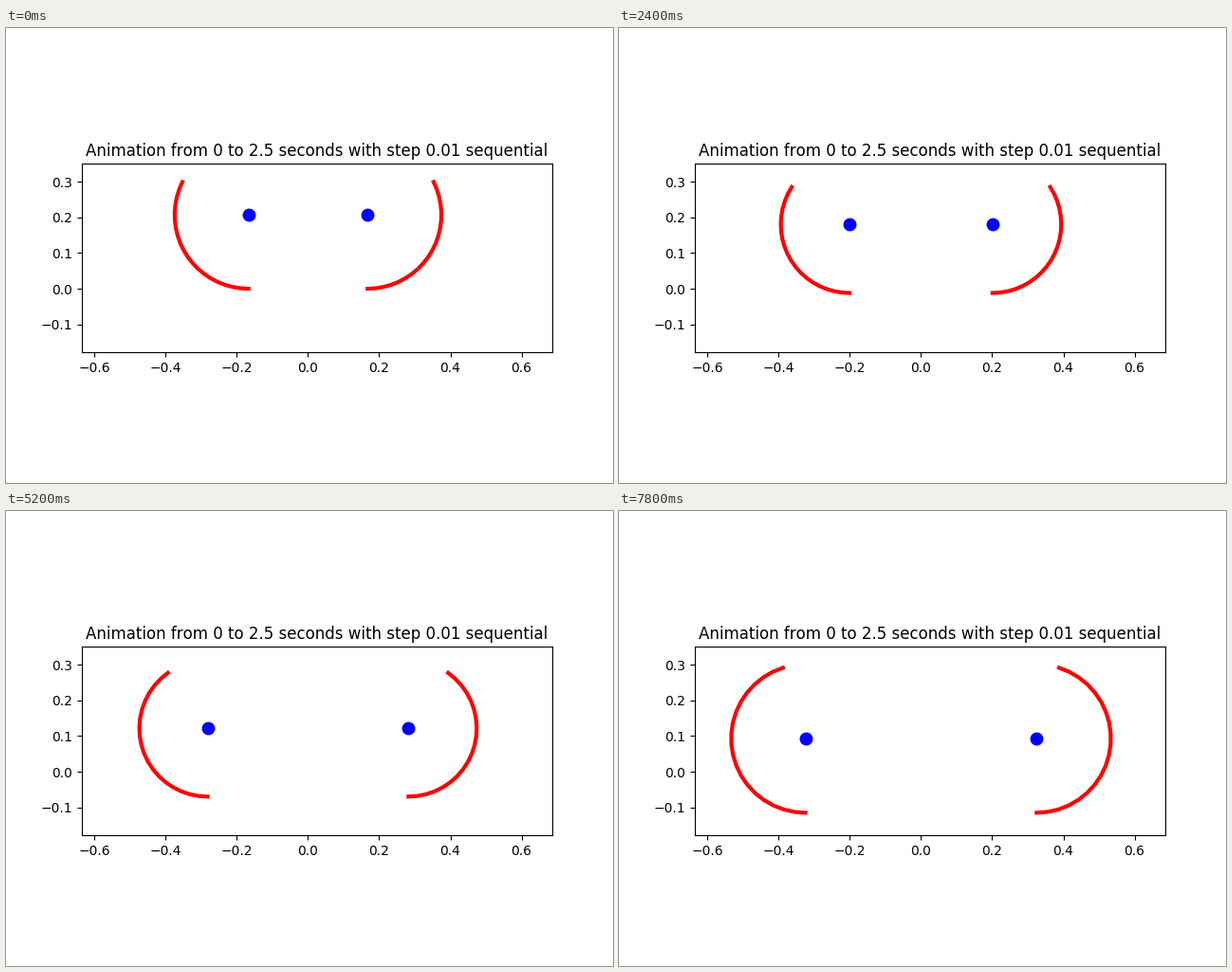
Recreate the animation shown at these times as a matplotlib script. Size 640 px wide and 480 px high, loop 8000 ms.

```python
import numpy as np
import matplotlib.pyplot as plt
from matplotlib.animation import FuncAnimation

FRAMES, INTERVAL = 40, 200
DT = 0.01
MASS, PRESSURE, G = 100, 2000, 10
AX, AY = 0.353, 0.3            # initial attachment point of the membrane
LENGTH = 3 * np.pi / 8         # total membrane length


def side_radius(phi):
    return (LENGTH / 2 - AX) / (phi - np.sin(phi))


def wrap_angle(height):
    """Angle of the side arc for a given attachment height (bisection)."""
    lo, hi = 1.0, np.pi
    for _ in range(60):
        phi = (lo + hi) / 2
        if side_radius(phi) * (1 - np.cos(phi)) > height:
            lo = phi
        else:
            hi = phi
    return phi


def simulate(steps):
    """Explicit Euler for the load; returns (x, y, phi) of the right arc."""
    height, speed, states = AY, 0.0, []
    for _ in range(steps):
        phi = wrap_angle(height)
        y = side_radius(phi)
        x = AX - y * np.sin(phi)
        states.append((x, y, phi))
        accel = PRESSURE * 2 * x / MASS - G
        height, speed = height + DT * speed, speed + DT * accel
    return states


states = simulate(FRAMES)

plt.rcParams["text.kerning_factor"] = 6
fig, ax = plt.subplots(figsize=(6.4, 4.8), dpi=100)
ax.set_aspect("equal")
ax.set_xlim(-0.6354, 0.6864)
ax.set_ylim(-0.1781, 0.3519)
ax.set_title("Animation from 0 to 2.5 seconds with step 0.01 sequential")

arcs = [ax.plot([], [], color="red", lw=3)[0] for _ in range(2)]
dots = [ax.plot([], [], "o", color="blue", ms=9)[0] for _ in range(2)]


def update(i):
    x, y, phi = states[i]
    r = np.hypot(AX - x, AY - y)
    a = np.linspace(0, phi, 20)
    for side, arc, dot in zip((-1, 1), arcs, dots):
        arc.set_data(side * (x + r * np.sin(a)), y - r * np.cos(a))
        dot.set_data([side * x], [y])
    return arcs + dots


anim = FuncAnimation(fig, update, frames=FRAMES, interval=INTERVAL,
                     repeat=True, repeat_delay=0)
plt.show()
```
